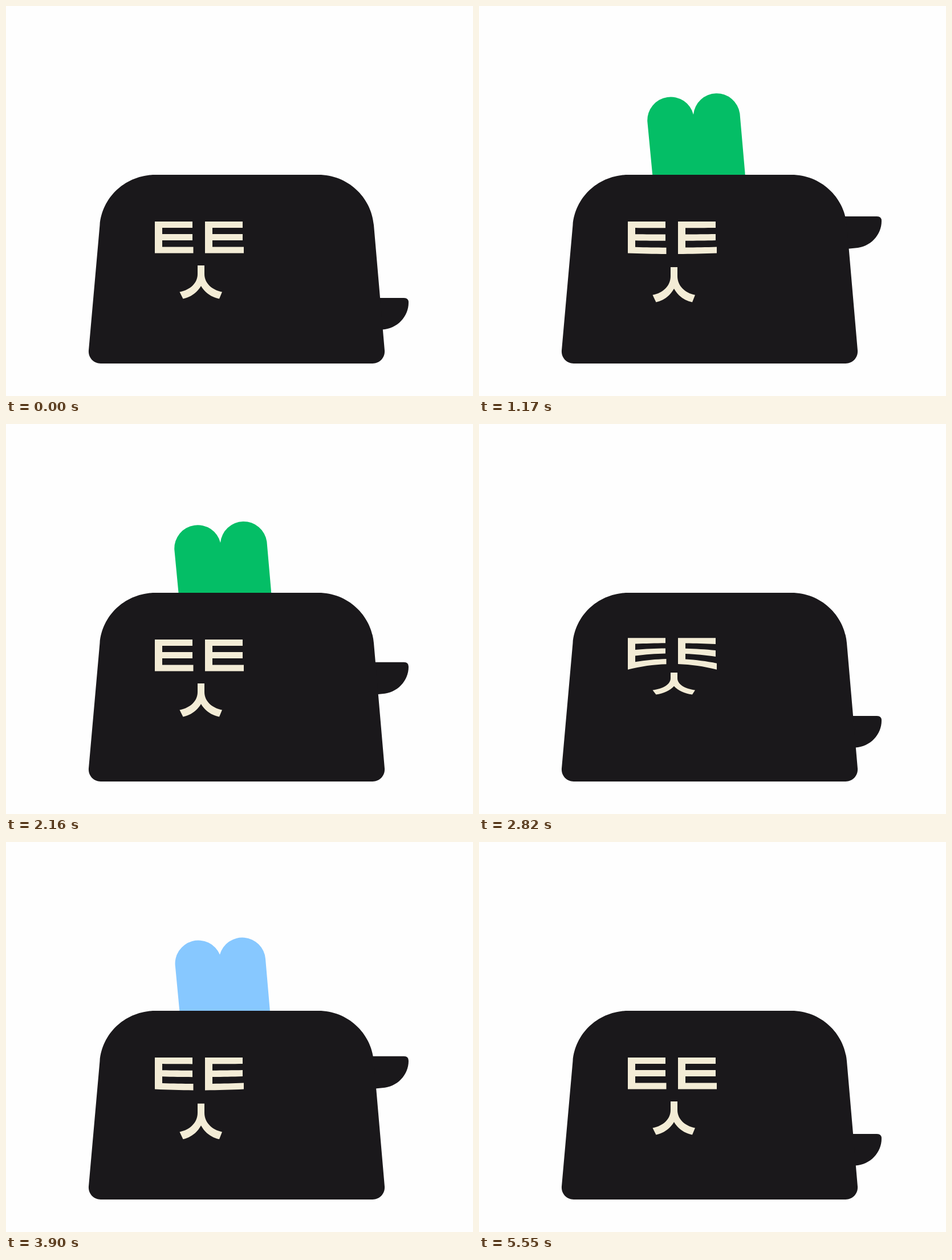
Animation, 819 px wide and 684 px high, one loop 5610 ms. Source, as an HTML page:

```html
<!DOCTYPE html>
<html lang="ko">
<head>
<meta charset="utf-8">
<title>Toaster</title>
<style>
html, body { margin: 0; width: 100%; height: 100%; overflow: hidden; background: #fefefe; }
svg { display: block; width: 100vw; height: 100vh; }
</style>
</head>
<body>
<svg viewBox="0 0 819 684">
  <g id="toast">
    <path id="green" fill="#04be66" d="M295.3 149A41 41 0 0 1 376 137A41 41 0 0 1 457.4 135L467 245Q467.5 252 461 252.6L313 265.6Q306.4 266 305.8 259Z"/>
    <path id="blue" fill="#87c8ff" d="M297 149.5A40.8 40.8 0 0 1 375 127.8A40.8 40.8 0 0 1 455 135L464.5 245Q465 252 458.5 252.6L315 265.5Q308 266 307.4 259Z"/>
  </g>
  <g fill="#1a181b">
    <path id="lever" d="M620 0H698Q706 0 706 8C706 33 686 54 660 55.5L640 57.5H620Z"/>
    <path d="M262 296H548C599 296 640.7 335 645 384L664 604C665 617 655 627 643 627H166C154 627 144 617 145 604L164.5 384C168.5 335 210 296 262 296Z"/>
  </g>
  <g fill="#f3ecd6">
    <path id="eyes"/>
    <path id="mouth" d="M336 0H348V15C348 31 361 43 379 46.5L374 58.5C360 55.5 349 48 342 36C335 48 324 55.5 310.5 58.5L304.5 46.5C323 43 336 31 336 15Z"/>
  </g>
</svg>
<script>
const LOOP = 5610;
// each cycle: when the strain starts and ends, and when the toast pops
const CYCLES = [
  { strain: 5, set: 600, pop: 990 },
  { strain: 2720, set: 3390, pop: 3780 }
];
const EYE = { top: 378, bottom: 433.5, mid: 339, half: 78 };
const TOAST = { up: 92, down: 318, drawn: 98 };
const LEVER = { up: 369, down: 512 };

const el = id => document.getElementById(id);
const clamp = v => Math.min(1, Math.max(0, v));
const span = (t, a, b) => clamp((t - a) / (b - a));
const mix = (a, b, k) => a + (b - a) * k;

function backOut(u) {
  const v = u - 1;
  return 1 + 2.7 * v ** 3 + 1.7 * v * v;
}

// 1 is the full strain, below 0 the face stretches past its rest
function strainAt(t, c) {
  const p = t - c.pop;
  if (p < -20) return backOut(span(t, c.strain, c.set));
  if (p < 90) return mix(-0.13, 1, (1 - span(p, -20, 90)) ** 2);
  return -0.13 * (1 - span(p, 90, 600)) ** 2;
}

const fall = p => span(p, 730, 1680) ** 1.4;
const flight = p => 1 - ((645 - Math.min(p, 645)) / 905) ** 2;

function toastAt(p) {
  if (p < 60) return flight(60) * span(p, -20, 60);
  return flight(p) - fall(p);
}

function leverAt(p) {
  return 1 - (1 - span(p, -15, 180)) ** 2.56 - fall(p);
}

function drawEyes(s) {
  const pos = Math.max(0, s);
  const shift = 15 * pos ** 3;
  const wide = 1 + 0.5 * Math.max(0, s - 1);
  const warp = (x, y) => {
    const n = (x - EYE.mid) / EYE.half;
    const depth = (y - EYE.top) / (EYE.bottom - EYE.top);
    const lift = 17 * s * (1 - n * n) * depth;
    return (EYE.mid + n * EYE.half * wide).toFixed(2) + ' ' + (y - shift - lift).toFixed(2);
  };
  const edge = (x0, x1, y) =>
    Array.from({ length: 9 }, (_, i) => warp(mix(x0, x1, i / 8), y));
  const eye = (x, end, tip) => {
    const stem = x + 13;
    return 'M' + [
      ...edge(x, end, 378), ...edge(end, stem, 389),
      ...edge(stem, end, 400), ...edge(end, stem, 411),
      ...edge(stem, tip, 422.5), ...edge(tip, x, 433.5)
    ].join('L') + 'Z';
  };
  el('eyes').setAttribute('d', eye(261, 327, 328.5) + eye(349, 415, 417));
}

function draw(t) {
  const second = t >= CYCLES[1].strain;
  const c = CYCLES[second ? 1 : 0];
  const p = t - c.pop;
  const s = strainAt(t, c);
  const move = (id, y, extra = '') =>
    el(id).setAttribute('transform', `translate(0 ${y.toFixed(2)})${extra}`);

  el('green').style.display = second ? 'none' : '';
  el('blue').style.display = second ? '' : 'none';
  move('toast', mix(TOAST.down, TOAST.up, toastAt(p)) - TOAST.drawn);
  move('lever', mix(LEVER.down, LEVER.up, leverAt(p)));
  move('mouth', 455 - 33 * s, ` scale(1 ${(1 - 0.6 * s).toFixed(4)})`);
  drawEyes(s);
}

const start = performance.now();
function tick() {
  draw((performance.now() - start) % LOOP);
  requestAnimationFrame(tick);
}
tick();
</script>
</body>
</html>
```
